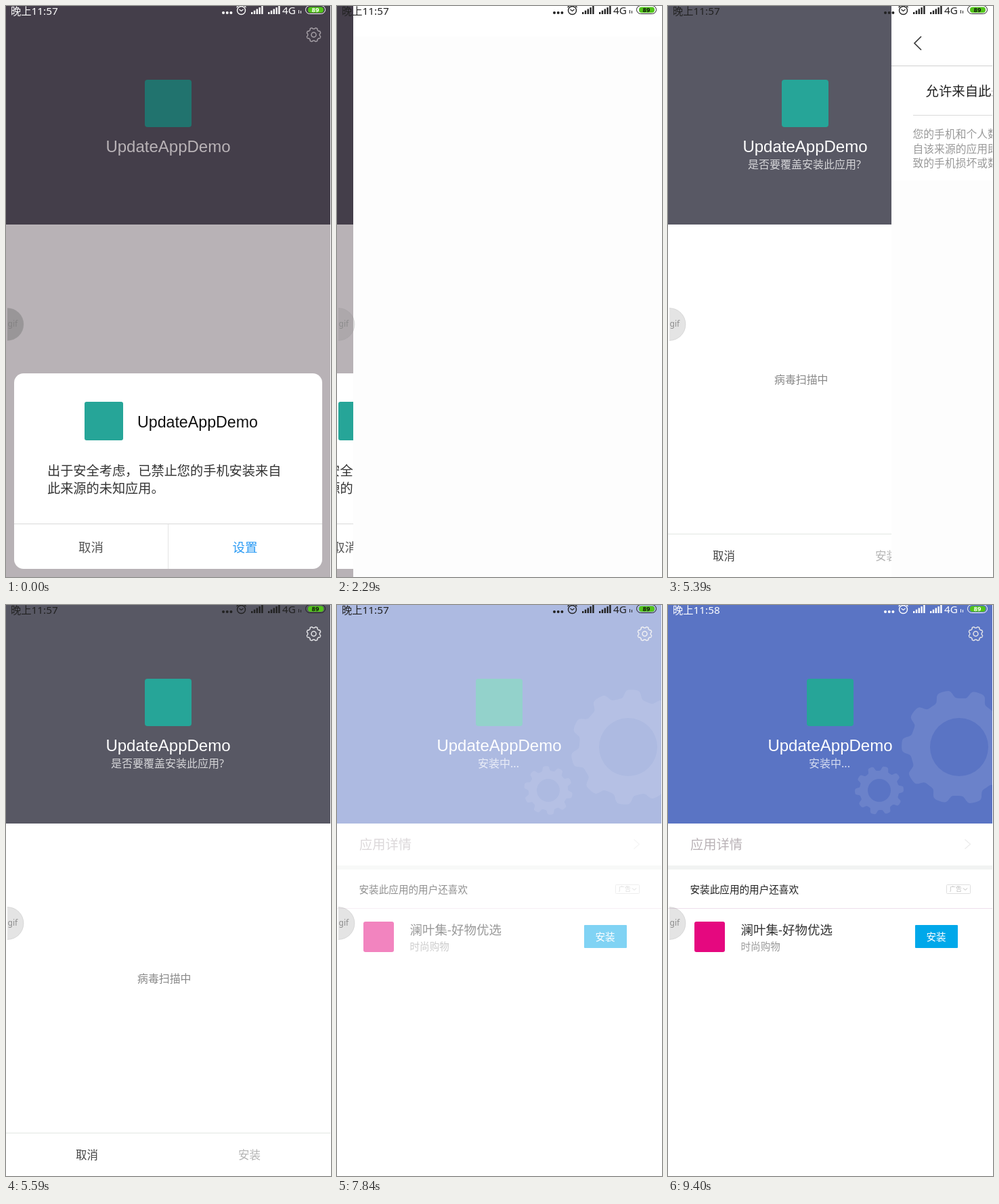
An HTML page with a canvas that plays this animation: 480x844 px, repeating every 9500 ms.

```html
<!DOCTYPE html>
<html lang="zh-CN">
<head>
<meta charset="utf-8">
<title>App install</title>
<style>
  html, body { margin: 0; width: 100%; height: 100%; overflow: hidden; background: #fff; }
  canvas { display: block; width: 100vw; height: 100vh; }
</style>
</head>
<body>
<canvas id="stage" width="480" height="844"></canvas>
<script>
const W = 480, H = 844, LOOP = 9500, TICK = 95;
const SANS = '"Noto Sans", "Noto Sans CJK SC", sans-serif';
const ARIAL = '"Liberation Sans", Arial, sans-serif';
const TEAL = '#26a598', LINE = '#dadada';
const c = document.getElementById('stage').getContext('2d');

const clamp = v => Math.min(1, Math.max(0, v));
const easeOut = p => 1 - (1 - p) ** 3;
const mix = (a, b, p) => a + (b - a) * p;
// The screen refreshes in ticks, counted from the start of each movement.
const hold = (t, start) => start + Math.floor((t - start) / TICK) * TICK;

// y is the visual middle of the line.
function text(str, x, y, size, color, { align = 'left', weight = 400, font = SANS } = {}) {
  c.font = `${weight} ${size}px ${font}`;
  c.textAlign = align;
  c.fillStyle = color;
  c.fillText(str, x, y + size * 0.38);
}

function rect(x, y, w, h, color) {
  c.fillStyle = color;
  c.fillRect(x, y, w, h);
}

function roundRect(x, y, w, h, r, fill, stroke) {
  c.beginPath();
  c.roundRect(x, y, w, h, r);
  if (fill) { c.fillStyle = fill; c.fill(); }
  if (stroke) { c.strokeStyle = stroke; c.lineWidth = 1; c.stroke(); }
}

function circle(x, y, r) {
  c.beginPath();
  c.arc(x, y, r, 0, 7);
}

function polyline(color, width, ...points) {
  c.beginPath();
  points.forEach(([x, y]) => c.lineTo(x, y));
  c.strokeStyle = color;
  c.lineWidth = width;
  c.stroke();
}

const chevron = (x, y, color) => polyline(color, 1.2, [x, y - 7], [x + 8, y], [x, y + 7]);

function gearPath(x, y, outer, root, hole, teeth, degrees) {
  c.beginPath();
  for (let i = 0; i < 240; i++) {
    const a = i / 240 * Math.PI * 2;
    const tooth = Math.tanh(2.5 * Math.cos(teeth * (a - degrees * Math.PI / 180)));
    const r = mix(root, outer, (tooth + 1) / 2);
    c.lineTo(x + r * Math.cos(a), y + r * Math.sin(a));
  }
  c.closePath();
  c.moveTo(x + hole, y);
  c.arc(x, y, hole, 0, 7);
}

function header(color, subtitle, drawBack) {
  rect(0, 0, W, H, '#fff');
  rect(0, 0, W, 323, color);
  if (drawBack) drawBack();
  gearPath(454.5, 42.5, 10.5, 8.8, 3.5, 8, 22.5);
  c.strokeStyle = '#e2e2e6';
  c.lineWidth = 1.5;
  c.stroke();
  roundRect(205, 109, 69, 70, 4, TEAL);
  text('UpdateAppDemo', 239.5, 207, 24, '#fff', { align: 'center', font: ARIAL });
  if (subtitle) text(subtitle, 238.5, 234, 16, 'rgba(255,255,255,.75)', { align: 'center' });
}

function blockedPage(pressed) {
  header('#585864');
  rect(0, 0, W, H, 'rgba(20,0,15,.3)');
  roundRect(12, 543, 455, 289, 14, '#fff');
  if (pressed) roundRect(240, 766, 227, 66, [0, 0, 14, 0], '#f6f4f7');
  roundRect(116, 585, 57, 57, 3, TEAL);
  text('UpdateAppDemo', 194, 614.5, 23.2, '#111', { font: ARIAL });
  text('出于安全考虑，已禁止您的手机安装来自', 61, 687, 19.2, '#333');
  text('此来源的未知应用。', 61, 713, 19.2, '#333');
  rect(12, 765, 455, 1, LINE);
  rect(239, 766, 1, 66, '#e4e4e4');
  text('取消', 125.5, 800, 18.5, '#555', { align: 'center' });
  text('设置', 353, 800, 18.5, '#2b9bf4', { align: 'center', weight: 500 });
}

function settingsPage(loaded, on) {
  rect(0, 0, W, H, '#fdfdfd');
  rect(0, 0, W, 45, '#fff');
  if (!loaded) return;
  rect(0, 45, W, 213, '#fff');
  polyline('#333', 1.6, [44, 45], [34, 55], [44, 65]);
  text('安装未知应用', 239, 56, 21, '#111', { align: 'center', weight: 500 });
  rect(0, 88, W, 1, '#d0d0d0');
  text('允许来自此来源的应用', 50.5, 125.5, 19.4, '#222');
  const track = [mix(243, 36, on), mix(240, 152, on), mix(245, 245, on)].map(Math.round);
  roundRect(397.5, 110.5, 58, 30, 15, `rgb(${track})`, on < 0.5 ? '#dcdcdc' : null);
  circle(mix(417, 437, on), 125.5, 12.5);
  c.fillStyle = '#fff';
  c.fill();
  c.strokeStyle = 'rgba(0,0,0,.12)';
  c.lineWidth = 1;
  c.stroke();
  rect(32, 161, W - 32, 1, LINE);
  ['您的手机和个人数据更容易受到未知应用的攻击。安装来',
   '自该来源的应用即表示，您同意对因使用这些应用可能导',
   '致的手机损坏或数据丢失承担责任。'
  ].forEach((line, i) => text(line, 31.5, 189 + i * 21.5, 15.8, '#999'));
}

function confirmPage(t) {
  const scanned = t >= 6380;
  header('#585864', '是否要覆盖安装此应用?');
  if (scanned) {
    text('应用来源', 33, 354, 19.3, '#111');
    text(':', 113, 354, 19.3, '#111');
    text('UpdateAppDemo', 125, 354, 19.3, '#111');
    rect(33, 383, W - 33, 1, '#d0d0d0');
    text('版本', 33, 414, 19.3, '#111');
    text(':', 74, 414, 19.3, '#111');
    text('1.1.0', 85, 414, 18.8, '#111');
    text('权限详情', 33, 474.5, 19.3, '#111');
    chevron(438.5, 474.5, '#b0b0b0');
    rect(33, 504, W - 33, 1, '#e6dfe6');
  } else {
    const dots = [5700, 5890, 5970].filter(at => t >= at).length;
    text('病毒扫描中' + '.'.repeat(dots), 194, 552, 15.9, '#888');
  }
  rect(0, 780, W, 1, '#e2e6e2');
  if (t >= 5700) rect(239, 781, 1, 63, '#e2e2e2');
  text('取消', 119.5, 813, 16.5, '#444', { align: 'center' });
  const enabled = t >= 6480 && t < 7460;
  text('安装', 359.5, 813, 16.5, enabled ? '#444' : '#b4b4b4', { align: 'center' });
}

function installingPage(t) {
  const turn = (hold(t, 7460) - 7840) / 1520 * 51;
  header('#5a74c4', '安装中...', () => {
    c.fillStyle = 'rgba(255,255,255,.1)';
    gearPath(430, 210, 85, 72, 43, 10, turn - 85);
    c.fill('evenodd');
    gearPath(312, 274, 36, 29, 17, 10, -turn - 96);
    c.fill('evenodd');
  });
  text('应用详情', 33, 353.5, 19.3, '#b9b2b6');
  chevron(438.5, 353.5, '#ebebeb');
  rect(0, 385, W, 6, '#f1f3f2');
  text('安装此应用的用户还喜欢', 32.5, 420.5, 14.6, '#222', { weight: 500 });
  roundRect(411.5, 413.5, 35, 13, 1, null, '#dedede');
  text('广告', 416, 420, 9, '#bbb');
  polyline('#bbb', 1, [436, 418.5], [439, 421.5], [442, 418.5]);
  rect(0, 448, W, 1, '#eddfeb');
  roundRect(39, 468, 45, 45, 3, '#e5087f');
  text('澜叶集-好物优选', 107.5, 479.5, 18.5, '#333');
  text('时尚购物', 107.5, 504, 14.6, '#999');
  roundRect(365, 473, 63, 34, 1, '#00a8ea');
  text('安装', 396, 490, 14.6, '#fff', { align: 'center' });
}

function statusBar(t, dark) {
  const color = dark ? '#222' : '#fff';
  text(t >= 9400 ? '晚上11:58' : '晚上11:57', 7, 7, 15.3, color);
  c.fillStyle = color;
  for (let i = 0; i < 3; i++) {
    circle(321 + i * 5.7, 10, 2);
    c.fill();
  }
  circle(347.5, 6.5, 6);
  c.strokeStyle = color;
  c.lineWidth = 1.4;
  c.stroke();
  polyline(color, 1.2, [344.5, 5], [347.5, 7.5], [350.5, 5]);
  polyline(color, 1.4, [340.5, 2], [343, 0]);
  polyline(color, 1.4, [352, 0], [354.5, 2]);
  for (const x of [362, 387])
    for (let i = 0; i < 5; i++) rect(x + i * 3.8, 9 - i * 2.3, 2.4, 3 + i * 2.3, color);
  text('4G', 408, 6.5, 15.3, color);
  const busy = t >= 2980 && t < 4930;
  rect(432, busy ? 8 : 6, 1, busy ? 3 : 5, color);
  rect(435, 7, 1, 4, color);
  roundRect(442.5, -0.5, 29, 12, 6, null, color);
  roundRect(446, 1.5, 23, 8.5, 4, '#52c41a');
  text('89', 457, 5.7, 9.5, dark ? '#111' : '#fff', { align: 'center', weight: 700 });
}

function bubble(t) {
  const dim = t < 2015;
  const alpha = dim ? (t < 110 ? 0.6 : 0.52) : 0.22;
  c.save();
  c.beginPath();
  c.rect(2, 440, 40, 60);
  c.clip();
  circle(2, 470.5, 24);
  c.fillStyle = `rgba(134,132,132,${alpha})`;
  c.fill();
  c.strokeStyle = 'rgba(150,150,150,.25)';
  c.lineWidth = 1;
  c.stroke();
  c.restore();
  text('gif', 2.5, 469, 12, dim ? 'rgba(100,100,100,.4)' : '#8c8c8c');
}

// Settings slides over the page below, which trails at a quarter of the distance.
function slide(p, belowPage, coverPage) {
  c.save();
  c.translate(-Math.round(p * W / 4), 0);
  belowPage();
  c.restore();
  c.save();
  c.translate(Math.round(W * (1 - p)), 0);
  coverPage();
  c.restore();
}

function draw(t) {
  rect(0, 0, W, H, '#fff');
  if (t < 2390) {
    const p = t < 1920 ? 0 : easeOut(clamp((hold(t, 1920) - 1920) / 450));
    slide(p, () => blockedPage(t >= 1920), () => settingsPage(false, 0));
  } else if (t < 5390) {
    settingsPage(t >= 2690, clamp((hold(t, 3830) - 3830) / 380));
  } else if (t < 5700) {
    const p = 1 - easeOut(clamp((hold(t, 5390) - 5300) / 280));
    slide(p, () => confirmPage(t), () => settingsPage(true, 1));
  } else {
    const now = hold(t, 7460);
    const fadeOut = clamp((now - 7460) / 285);
    const fadeIn = clamp((now - 7650) / 380);
    if (fadeOut < 1) confirmPage(t);
    else installingPage(t);
    rect(0, 0, W, H, `rgba(255,255,255,${fadeOut < 1 ? fadeOut : 1 - fadeIn})`);
  }
  rect(W - 1, 0, 1, H, '#fff');
  statusBar(t, (t >= 2110 && t < 5700) || (t >= 7740 && t < 8030));
  bubble(t);
}

function frame(now) {
  draw(now % LOOP);
  requestAnimationFrame(frame);
}
requestAnimationFrame(frame);
</script>
</body>
</html>
```
